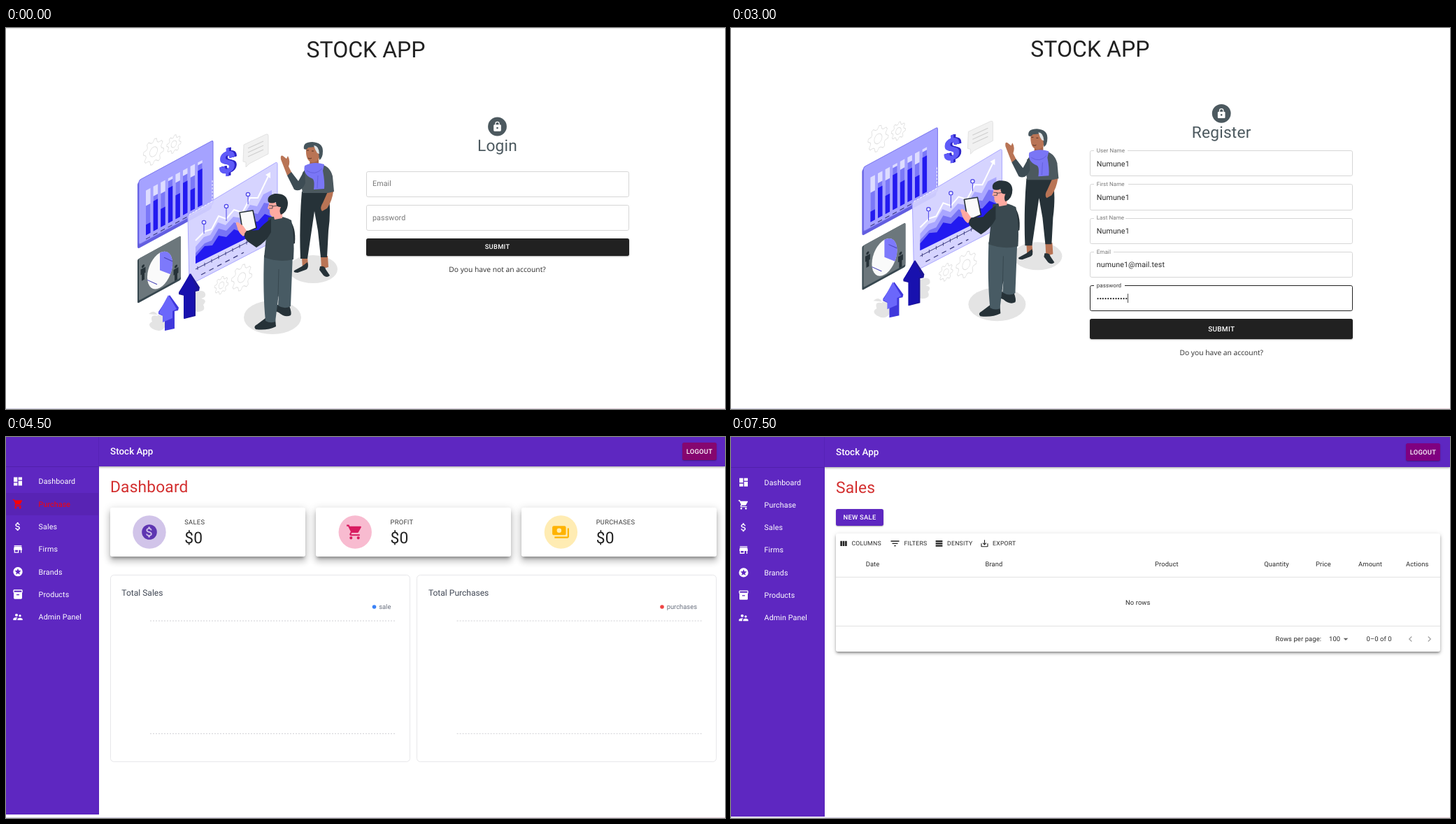
Write an HTML page that moves like this. It is 1028 by 545 pixels and loops after 8000 ms.

```html
<!DOCTYPE html>
<html lang="en">
<head>
<meta charset="utf-8">
<title>Stock App</title>
<style>
html, body { margin: 0; width: 100%; height: 100%; overflow: hidden; background: #fff; }
#stage { position: relative; width: 1028px; height: 545px; overflow: hidden; }
.scene { position: absolute; inset: 0; background: #fff; visibility: hidden; animation: show 8s step-end infinite; }
.scene:last-child { animation-name: last; }
.scene svg { position: absolute; left: 0; top: 0; }
.box { position: absolute; box-sizing: border-box; }
.foot { left: 0; top: 544px; width: 1028px; height: 1px; background: linear-gradient(90deg, #cfcde0, #d6cddc 60%, #e2cdd6); }
text { font-family: Roboto, Arial, sans-serif; text-rendering: geometricPrecision; white-space: pre; }
.note { font-family: "Open Sans", "Noto Sans", sans-serif; }
.field { border: 1px solid #d6d6d6; border-radius: 2.7px; }
.focus { border: 1.4px solid #212121; }
.btn { border-radius: 2.7px; box-shadow: 0 1px 1px #0003, 0 1px 3px #0002; }
.card { background: #fff; border-radius: 2.7px; box-shadow: 0 4px 4px -2px #0005, 0 7px 9px 1px #0002, 0 3px 12px 2px #0002; }
.paper { background: #fff; border-radius: 2.7px; box-shadow: 0 2px 3px -1px #0005, 0 3px 4px #0003, 0 1px 7px #0002; }
.panel { border: 1px solid #e7e7ea; border-radius: 5.4px; }
.bar { background: #5e27c1; box-shadow: 0 1px 3px #0006; }
@keyframes show { 0% { visibility: visible } 18.75%, 100% { visibility: hidden } }
@keyframes last { 0% { visibility: visible } 6.25%, 100% { visibility: hidden } }
</style>
</head>
<body>
<div id="stage"></div>
<script>
const PURPLE = '#5e27c1', INK = '#2b2b2b', SLATE = '#4c595f', BLUE = '#231af0';
const ICONS = {
  lock: 'M18 8h-1V6a5 5 0 0 0-10 0v2H6a2 2 0 0 0-2 2v10a2 2 0 0 0 2 2h12a2 2 0 0 0 2-2V10a2 2 0 0 0-2-2zm-6 9a2 2 0 1 1 0-4 2 2 0 0 1 0 4zm3.1-9H8.9V6a3.1 3.1 0 0 1 6.2 0z',
  dash: 'M3 13h8V3H3zm0 8h8v-6H3zm10 0h8V11h-8zm0-18v6h8V3z',
  cart: 'M7 18a2 2 0 1 0 0 4 2 2 0 0 0 0-4zM1 2v2h2l3.6 7.59-1.35 2.45C4.5 15.3 5.5 17 7 17h12v-2H7.42a.25.25 0 0 1-.22-.37l.9-1.63h7.45c.75 0 1.41-.41 1.75-1.03l3.58-6.49A1 1 0 0 0 20 4H5.21l-.94-2zm16 16a2 2 0 1 0 0 4 2 2 0 0 0 0-4z',
  money: 'M11.8 10.9c-2.27-.59-3-1.2-3-2.15 0-1.09 1.01-1.85 2.7-1.85 1.78 0 2.44.85 2.5 2.1h2.21c-.07-1.72-1.12-3.3-3.21-3.81V3h-3v2.16c-1.94.42-3.5 1.68-3.5 3.61 0 2.31 1.91 3.46 4.7 4.13 2.5.6 3 1.48 3 2.41 0 .69-.49 1.79-2.7 1.79-2.06 0-2.87-.92-2.98-2.1h-2.2c.12 2.19 1.76 3.42 3.68 3.83V21h3v-2.15c1.95-.37 3.5-1.5 3.5-3.55 0-2.84-2.43-3.81-4.7-4.4z',
  store: 'M20 4H4v2h16zm1 10v-2l-1-5H4l-1 5v2h1v6h10v-6h4v6h2v-6zm-9 4H6v-4h6z',
  star: 'M12 2a10 10 0 1 0 0 20 10 10 0 0 0 0-20zm4.23 16L12 15.45 7.77 18l1.12-4.81-3.73-3.23 4.92-.42L12 5l1.92 4.53 4.92.42-3.73 3.23z',
  stock: 'M20 2H4c-1 0-2 .9-2 2v3c0 .72.43 1.34 1 1.7V20c0 1.1 1.1 2 2 2h14c.9 0 2-.9 2-2V8.7c.57-.36 1-.98 1-1.7V4c0-1.1-1-2-2-2zm-5 12H9v-2h6zm5-7H4V4h16z',
  users: 'M16.5 12a2.5 2.5 0 1 0 0-5 2.5 2.5 0 0 0 0 5zM9 11a3 3 0 1 0 0-6 3 3 0 0 0 0 6zm7.5 3c-1.83 0-5.5.92-5.5 2.75V19h11v-2.25c0-1.83-3.67-2.75-5.5-2.75zM9 13c-2.33 0-7 1.17-7 3.5V19h7v-2.25c0-.85.33-2.34 2.37-3.47A12 12 0 0 0 9 13z',
  notes: 'M19 14V6a2 2 0 0 0-2-2H3a2 2 0 0 0-2 2v8c0 1.1.9 2 2 2h14a2 2 0 0 0 2-2zm-9-1a3 3 0 1 1 0-6 3 3 0 0 1 0 6zm13-6v11a2 2 0 0 1-2 2H4v-2h17V7z',
  cols: 'M3 5h5v14H3zM9.5 5h5v14h-5zM16 5h5v14h-5z',
  filter: 'M10 18h4v-2h-4zM3 6v2h18V6zm3 7h12v-2H6z',
  dense: 'M3 4h18v4H3zM3 10h18v4H3zM3 16h18v4H3z',
  save: 'M19 12v7H5v-7H3v7c0 1.1.9 2 2 2h14a2 2 0 0 0 2-2v-7zm-6 .67l2.59-2.58L17 11.5l-5 5-5-5 1.41-1.41L11 12.67V3h2z',
  prev: 'M15.4 7.4L14 6l-6 6 6 6 1.4-1.4L10.8 12z',
  next: 'M10 6L8.6 7.4l4.6 4.6-4.6 4.6L10 18l6-6z',
  down: 'M7 10l5 5 5-5z'
};

const range = (n, fn) => Array.from({ length: n }, (_, i) => fn(i)).join('');
const box = (x, y, w, h, cls, style = '') =>
  `<div class="box ${cls}" style="left:${x}px;top:${y}px;width:${w}px;height:${h}px;${style}"></div>`;
const text = (x, y, str, size, fill = INK, more = '') =>
  `<text x="${x}" y="${y}" font-size="${size}" fill="${fill}" ${more}>${str}</text>`;
const mid = 'text-anchor="middle"';
const caps = 'text-anchor="middle" font-weight="500" letter-spacing=".27"';
const icon = (x, y, size, name, fill) =>
  `<path transform="translate(${x - size / 2} ${y - size / 2}) scale(${size / 24})" fill="${fill}" d="${ICONS[name]}"/>`;
const path = (d, fill, more = '') => `<path d="${d}" fill="${fill}" ${more}/>`;
const line = (d, stroke, w = 1, more = '') => path(d, 'none', `stroke="${stroke}" stroke-width="${w}" ${more}`);
const circle = (x, y, r, fill, more = '') => `<circle cx="${x}" cy="${y}" r="${r}" fill="${fill}" ${more}/>`;
const oval = (x, y, rx, ry, fill) => `<ellipse cx="${x}" cy="${y}" rx="${rx}" ry="${ry}" fill="${fill}"/>`;
const rect = (x, y, w, h, fill, more = '') => `<rect x="${x}" y="${y}" width="${w}" height="${h}" fill="${fill}" ${more}/>`;
const group = (tf, body) => `<g transform="${tf}">${body}</g>`;
const page = (boxes, art) =>
  `${boxes}<svg width="1028" height="545" viewBox="0 0 1028 545">${art}</svg><div class="box foot"></div>`;

// ---- illustration ----
function gear(x, y, r) {
  const pts = Array.from({ length: 32 }, (_, i) => {
    const a = (i + .5) * Math.PI / 16, k = i % 4 < 2 ? r : r * .76;
    return (k * Math.cos(a)).toFixed(1) + ' ' + (k * Math.sin(a)).toFixed(1);
  });
  return group(`translate(${x} ${y}) skewY(-24) scale(.82 1)`,
    path('M' + pts.join('L') + 'z', '#fff', 'stroke="#e0e0e0"') + circle(0, 0, r * .38, '#fff', 'stroke="#e0e0e0"'));
}

function barPanel() {
  const low = [15, 43, 26, 50, 34, 46, 30, 52], top = [42, 50, 48, 60, 52, 56, 48, 60];
  return group('translate(188 219) skewY(-28.4)',
    rect(0, 2, 106, 95, '#625ee0', 'rx="3"') + rect(2, 0, 106, 92, '#a5a2ff', 'rx="3" stroke="#7773ee"') +
    range(8, i => {
      const x = 12 + 10.6 * i;
      return rect(x, 20, 6.5, 64, '#dddcff') + rect(x, 84 - top[i], 6.5, top[i], '#7b78f8') +
        rect(x, 84 - low[i], 6.5, low[i], BLUE);
    }) +
    line('M12 89.5H98', '#34347c', 1.2, 'stroke-dasharray="6 4.5"'));
}

function piePanel() {
  const man = (x, y) => circle(x, y, 2.1, '#263238') + path(`M${x - 3.5} ${y + 3}h7v8h-1.5v9h-4v-9h-1.5z`, '#263238');
  return group('translate(188 331) skewY(-28.6)',
    rect(0, 0, 62, 63, '#37474f', 'rx="2"') + rect(2, 0, 60, 60, '#6c777c', 'rx="2"') +
    oval(32, 33, 18, 25, '#fafafa') + path('M32 33V8A18 25 0 0 1 47 47z', '#7d79fb') +
    man(8, 14) + man(55, 40) + line('M38 18l12 12M14 37l14 14', '#4b47b8', .8));
}

function areaPanel() {
  const pin = (x, y, h) => line(`M${x} ${y + 3}v${h}`, '#4b45e8') + circle(x, y, 2.7, '#e8e7ff', 'stroke="#4b45e8" stroke-width="1.2"');
  return path('M263 266L385 193Q388 191 388 195V299Q388 302 385 304L265 366Q262 367 262 364L260 271Q260 268 263 266z', '#d3d1ff', 'fill-opacity=".93" stroke="#aaa7ff"') +
    line('M262 267L295 248V216', '#fff', 1, 'stroke-dasharray="3 2"') +
    path('M271 313L283 299 292 296 303 278 314 282 325 270 337 272 349 253 359 255 368 238 380 232V283L271 337z', '#aaa7ff') +
    path('M271 322L284 308 294 304 304 287 315 290 326 278 338 283 350 264 360 266 369 250 380 252V283L271 337z', '#7773f5') +
    path('M271 327L284 312 295 311 304 297 315 299 326 288 338 292 350 276 360 277 370 266 380 270V283L271 337z', BLUE) +
    line('M271 304L284 291 294 288 304 269 315 273 326 260 338 264 349 243 360 243 376 210', '#fff', 2) +
    path('M371 210l7-4 0 9z', '#fff') +
    pin(283, 278, 13) + pin(315, 255, 18) + pin(346, 238, 11) +
    line('M271 345L382 287', '#3c3c80') +
    range(11, i => line(`M${274 + 10 * i} ${341 - 5.2 * i}v5`, '#3c3c80', .9)) +
    line('M279 353L340 321', '#3c3c80', 1.3, 'stroke-dasharray="7 6"');
}

function arrows() {
  return path('M204 409q9-8 13 3 -12-3-8 8 -8 4 0 10 12 7 18-2l4-16zM268 381q11-8 16-3 4 7-5 9 10 2 3 9 5 9-8 10l-8-2z', '#e4e4e4') +
    path('M264 351l13 20-1 5-5 1v35l-16 4V383l-8-2V378z', '#1c1595') + path('M263 351l10 23-4 2v35l-15 5V382l-7-3z', '#1811ae') +
    path('M234 382l13 18-1 4-5 1v25l-14 3V413l-9-4V406z', '#4038dc') + path('M232 382l12 20-6 3v10l-14 6V411l-6-3z', '#6b67fb');
}

function woman() {
  const skin = '#b97455';
  return path('M423 328h8l1 11-8 6zM450 326h10l1 16-10 3z', skin) +
    path('M431 335q3 9-3 11l-11 4q-7 0-5-3l11-6zM449 341q7-1 8 4l6 9q-4 4-9 0l-6-8z', '#263238') +
    path('M423 234L461 232Q465 262 461 290L459 328H450L446 290 441 262 436 296 431 330H421Q419 280 423 234z', '#263238') +
    path('M402 211L393 188Q392 181 396 183L401 187 403 183Q407 190 404 198L409 208zM461 232l7 2Q466 248 459 258L452 262Q448 258 453 250z', skin) +
    path('M424 207Q432 196 446 194 463 196 467 212L469 234 460 236H424Q421 222 424 207z', SLATE) +
    path('M427 203L418 219 408 206 402 211 412 231Q422 236 428 222z', '#3d4c54') +
    path('M435 184h12v14q-7 5-13-1z', '#a56346') +
    path('M427 197Q440 190 455 195L453 204Q456 220 455 230L440 231Q442 216 437 215 424 209 427 197z', '#7a76f5') +
    line('M430 204Q442 212 452 201M446 211L445 229', '#5f5bd6', .8) +
    path('M429 172Q430 165 440 166L449 170V184Q444 194 437 192 428 190 429 172z', skin) +
    path('M426 173Q424 163 438 163 453 164 453 176 453 186 448 189L447 179Q443 177 442 170L432 171Q430 175 426 173z', '#46555c') +
    path('M440 168q7 0 8 12l-3-1q-3-4-5-11z', '#dfe2e3') + line('M430 175h3M437 176h3M432 186q3 2 5 0', '#4a2c20', .9);
}

function man() {
  return path('M387 396l18 1q4 11 2 14-8 4-17-4l-5-2zM371 415l14 1 1 11q-12 6-29 4-4-4 2-7z', '#263238') +
    path('M369 325L410 322 407 398Q398 403 389 397L390 380 385 420Q378 423 371 419 367 380 369 325z', '#485b64') +
    line('M390 345L389 384', '#37474f') +
    path('M405 274Q415 285 413 308L405 311z', '#263238') +
    path('M375 271Q392 266 408 275 413 300 411 331 390 336 369 328z', '#3a4950') +
    path('M334 264L353 261 358 286 339 294z', '#fafafa', 'stroke="#263238" stroke-width="1.6" stroke-linejoin="round"') +
    path('M330 283q-3-6 2-5l7 5 7 10-7 5q-7-5-9-15z', '#ffa9a0') +
    path('M379 273Q368 280 361 289L344 290Q337 297 345 305L358 314Q372 306 379 292z', '#263238') +
    path('M377 248L374 258 377 260Q376 269 383 270L384 274 395 272 396 252z', '#ffaaa1') +
    path('M375 249Q372 240 384 237 402 236 403 250 403 263 393 267 390 262 393 256 386 257 386 249 380 252 375 249z', '#263238') +
    line('M376 254h5v4h-5M381 255l9-1', '#263238', .8);
}

function dollar() {
  const sign = (dx, fill) => text(dx, 0, '$', 42, fill, `${mid} font-weight="900" stroke="${fill}"`);
  return group('translate(316 207) skewY(-14)', [3, 2, 1].map(d => sign(d, '#2c24c8')).join('') + sign(0, '#5f5bf8'));
}

const art = [
  gear(211, 177, 18), gear(240, 166, 12.5), gear(308, 368, 12), gear(337, 357, 18),
  path('M340 167L372 152Q375 151 375 154V180L348 194 343 199V192L339 191z', '#f1f1f1', 'stroke="#e2e2e2"'),
  line('M346 172L368 162M346 178L368 168M346 184L368 174', '#cfcfcf', 1.2),
  oval(439, 345, 35, 20, '#e4e4e4'), oval(381, 414, 41, 24, '#e4e4e4'),
  barPanel(), dollar(), areaPanel(), piePanel(), arrows(), woman(), man()
].join('');

// ---- sign-in pages ----
const head = (x, y, name) => circle(x, y, 13.4, SLATE) + icon(x, y, 16, 'lock', '#fff') +
  text(x, y + 35, name, 22.76, SLATE, `${mid} letter-spacing=".17"`);
const title = (x, y) => text(x, y, 'STOCK APP', 32.1, '#212121', mid);
const hint = (x, y, str) => text(x, y, str, 10.7, '#777', 'letter-spacing=".1"');
const ask = (x, y, str) => text(x, y, str, 10.3, INK, `class="note" ${mid}`);

function login() {
  return page(
    box(0, 0, 1028, 1, '', 'background:#e4e4e4') +
    box(514.5, 204.5, 376, 37.4, 'field') + box(514.5, 252.8, 376, 37.4, 'field') +
    box(514.5, 301, 376, 24.5, 'btn', 'background:#212121'),
    title(514.5, 41.8) + art + head(702.5, 141, 'Login') + hint(524, 226.3, 'Email') + hint(524, 274.5, 'password') +
    text(702.5, 316.4, 'SUBMIT', 9.37, '#fff', caps) + ask(702.5, 348.5, 'Do you have not an account?'));
}

function register(dx, dy, values) {
  const names = ['User Name', 'First Name', 'Last Name', 'Email', 'password'];
  const gaps = [48, 49, 45, 28, 44], left = 515 + dx, cx = 702.8 + dx;
  let boxes = box(left, 414 + dy, 375.6, 28.4, 'btn', 'background:#212121');
  let over = title(515 + dx, 38.5 + dy) + group(`translate(${1 + dx} ${-21 + dy})`, art) + head(cx, 120 + dy, 'Register') +
    text(cx, 431.5 + dy, 'SUBMIT', 10.04, '#fff', caps) + ask(cx, 465.5 + dy, 'Do you have an account?');
  names.forEach((name, i) => {
    const y = 172.8 + 48.25 * i + dy, focus = values && i === 4;
    boxes += box(left, y, 375.6, 37.4, focus ? 'field focus' : 'field');
    if (!values) { over += hint(524.3, y + 22, name); return; }
    boxes += box(left + 5.5, y - 1, gaps[i], 4, '', 'background:#fff');
    over += text(left + 9.3, y + 2.8, name, 8.03, focus ? '#333' : '#777', 'letter-spacing=".08"') +
      text(left + 9.3, y + 22.4, values[i], 10.7, INK, 'letter-spacing=".1"');
    if (focus) over += rect(left + 53.7, y + 12, .8, 13, '#222');
  });
  if (!values) boxes += box(0, 540, 1028, 1, '', 'background:#dadada');
  return page(boxes, over);
}

// ---- app pages ----
const MENU = [['dash', 'Dashboard'], ['cart', 'Purchase'], ['money', 'Sales'], ['store', 'Firms'],
  ['star', 'Brands'], ['stock', 'Products'], ['users', 'Admin Panel']];

function shell(o) {
  const boxes = box(0, 0, 1028, o.top, 'bar') + box(0, 0, o.side, o.end, '', `background:${PURPLE}`) +
    box(0, o.top, o.side, 1, '', 'background:#5120ac') + box(o.side - 1, 0, 1, o.end, '', 'background:#5723b6') +
    (o.hot ? box(0, 80, o.side - 1, 32, '', 'background:#5823b4') : '') +
    box(o.out, o.top - 33.5, 48.7, 24.6, 'btn', `background:${o.hot ? '#86066f' : '#800080'}`);
  const over = text(o.side + 16, o.top - 17, 'Stock App', 13.39, '#fff', 'font-weight="500" letter-spacing=".05"') +
    text(o.out + 24.4, o.top - 17.9, 'LOGOUT', 9.37, '#fff', caps) +
    MENU.map(([ic, name], i) => {
      const y = o.top + 22 + 32.3 * i, fill = o.hot && i === 1 ? '#ff0000' : '#fff';
      return icon(o.side - 116, y, 16, ic, fill) + text(o.side - 86.4, y + 3.8, name, 10.7, fill, 'letter-spacing=".1"');
    }).join('') +
    text(o.side + 16, o.top + 37.6, o.name, 22.76, '#d32f2f', 'letter-spacing=".17"');
  return [boxes, over];
}

function dashboard() {
  const [boxes, over] = shell({ side: 133, top: 41.5, end: 540, out: 967, name: 'Dashboard', hot: true });
  const cards = [['SALES', '#d1c4e9', '#5e35b1'], ['PROFIT', '#f8bbd0', '#d81b60'], ['PURCHASES', '#ffecb3', '#ffb300']];
  const charts = [['Total Sales', 'sale', 526.5, '#3b82f6'], ['Total Purchases', 'purchases', 938, '#ef4444']];
  const marks = [
    circle(205, 136, 10.8, '#5e35b1') + icon(205, 136, 20, 'money', '#d1c4e9'),
    icon(498.5, 136, 25, 'cart', '#d81b60'), icon(793, 136, 26, 'notes', '#ffb300')];
  return page(
    boxes + range(3, i => box(149 + 294.1 * i, 101, 279, 70, 'card')) + range(2, i => box(148.5 + 438.7 * i, 197, 429, 268, 'panel')),
    over + cards.map(([name, tint], i) => {
      const x = 294.2 * i;
      return circle(205 + x, 136, 23.7, tint) + marks[i] +
        text(255.3 + x, 125.2, name, 9.37, '#3a3a3a', 'letter-spacing=".27"') + text(255.3 + x, 152, '$0', 22.76, '#212121', 'letter-spacing=".17"');
    }).join('') +
    charts.map(([name, key, dot, fill], i) => {
      const x = 438.6 * i;
      return text(165.3 + x, 227, name, 12.05, '#414855') + circle(dot, 243, 2.8, fill) + text(dot + 6.7, 246.2, key, 9.37, '#6b7280') +
        [263, 424.3].map(y => line(`M${206 + x} ${y}h350`, '#cfcfd4', 1, 'stroke-dasharray="2 2"')).join('');
    }).join(''));
}

function table(o) {
  const [boxes, over] = shell(o), left = o.side + 16, dy = o.dy, w = o.right - left;
  const tools = [['cols', 11, 12.5, 'COLUMNS', 22.4], ['filter', 84.5, 16, 'FILTERS', 97.4],
    ['dense', 147.5, 13, 'DENSITY', 159], ['save', 212.5, 13.5, 'EXPORT', 224]];
  const cell = (x, y, str, more = mid) => text(x, y + dy, str, 9.37, INK, more + ' letter-spacing=".12"');
  const cols = [...o.cols, ['Quantity', 780], ['Price', 847], ['Amount', 914], ['Actions', 981.3]];
  return page(
    boxes + box(left, 103.5 + dy, o.btnW, 24.7, 'btn', `background:${PURPLE}`) + box(left, 139 + dy, w, 168.3, 'paper') +
    [201, 271].map(y => box(left, y + dy, w, 1, '', 'background:#e2e2e2')).join(''),
    over + text(left + o.btnW / 2, 119.1 + dy, o.btn, 9.37, '#fff', caps) +
    tools.map(([ic, x, size, name, tx]) => icon(left + x, 153 + dy, size, ic, '#222') +
      text(left + tx, 156 + dy, name, 8.7, INK, 'letter-spacing=".25"')).join('') +
    cols.map(([name, x]) => cell(x, 185.8, name)).join('') +
    cell((left + o.right) / 2, 240.2, 'No rows') + cell(778.6, 293, 'Rows per page:', '') + cell(855, 292.6, '100', '') +
    cell(908.5, 293, '0–0 of 0', '') + icon(879, 289.7 + dy, 16, 'down', '#666') +
    icon(971.5, 289.7 + dy, 16, 'prev', '#a5a5a5') + icon(998.5, 289.7 + dy, 16, 'next', '#a5a5a5'));
}

const scenes = [
  login(),
  register(0, 0),
  register(-1.6, 2.3, ['Numune1', 'Numune1', 'Numune1', 'numune1@mail.test', '•'.repeat(12)]),
  dashboard(),
  table({ side: 131.5, top: 43, end: 541, out: 965.5, name: 'Purchases', btn: 'NEW PURCHASE', btnW: 95, dy: 0, right: 1014,
    cols: [['Date', 200.5], ['Firm', 333.3], ['Brand', 498.3], ['Product', 663.5]] }),
  table({ side: 134, top: 42.7, end: 543, out: 965, name: 'Sales', btn: 'NEW SALE', btnW: 68, dy: -.7, right: 1013.5,
    cols: [['Date', 202.5], ['Brand', 376], ['Product', 622.8]] })
];
document.getElementById('stage').innerHTML = scenes.map((s, i) =>
  `<div class="scene" style="animation-delay:${(i ? 1.5 * i - 8 : 0)}s">${s}</div>`).join('');
</script>
</body>
</html>
```
